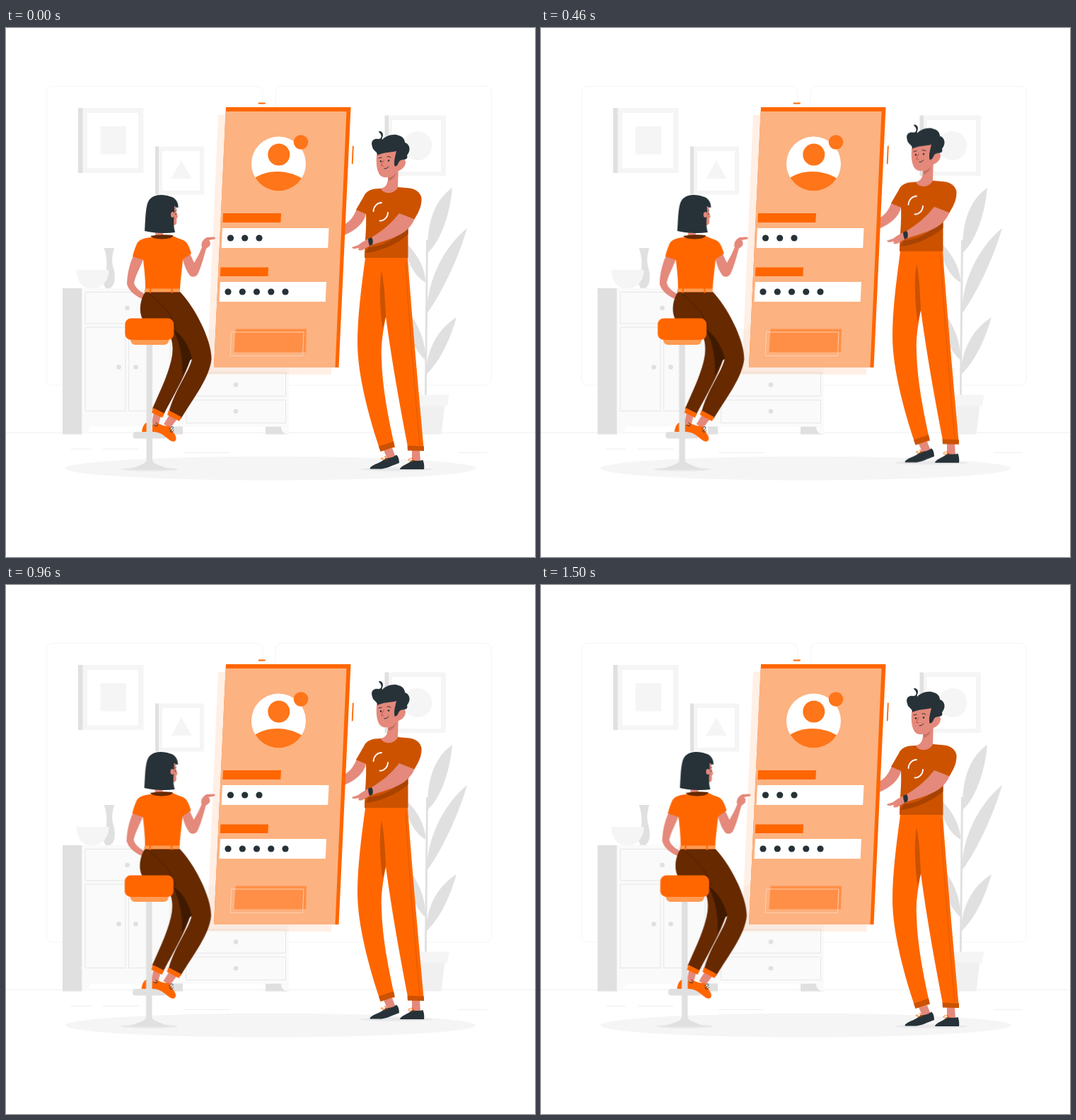
An HTML page without scripts for the animation above (1540 ms loop, 748 by 748 pixels).

```html
<!DOCTYPE html>
<html lang="en">
<head>
<meta charset="utf-8">
<title>Sign in illustration</title>
<style>
html, body { margin: 0; width: 100%; height: 100%; overflow: hidden; background: #fff; }
svg { display: block; width: 100vw; height: 100vh; }
.orange { fill: #f60; }
.rust { fill: #cc5200; }
.brown { fill: #662900; }
.peach { fill: #ff9a52; }
.skin { fill: #e4897b; }
.ink { fill: #263238; }
.white { fill: #fff; }
.g1 { fill: #fafafa; }
.g2 { fill: #f5f5f5; }
.g3 { fill: #f0f0f0; }
.g4 { fill: #e0e0e0; }
.line { fill: none; stroke-linecap: round; }
.man { animation: lift 1540ms linear infinite; }
.woman { animation: sway 1540ms linear infinite; }
@keyframes lift {
  0%, 97.4%, 100% { transform: translateY(0); }
  18.8% { transform: translateY(-5.4px); }
  29.9% { transform: translateY(-9.3px); }
  43.5% { transform: translateY(-14.1px); }
  46.8% { transform: translateY(-15px); }
  62.3% { transform: translateY(-10px); }
  76% { transform: translateY(-5.2px); }
}
@keyframes sway {
  0%, 100% { transform: translateX(0); }
  18.8% { transform: translateX(2px); }
  29.9% { transform: translateX(-3.3px); }
  43.5% { transform: translateX(-2px); }
  62.3% { transform: translateX(-.5px); }
  76% { transform: translateX(3px); }
  97.4% { transform: translateX(.4px); }
}
</style>
</head>
<body>
<svg viewBox="0 0 748 748">
  <defs>
    <clipPath id="avatar"><circle cx="385.5" cy="192" r="38.5"/></clipPath>
    <circle id="dot" r="4.6" class="ink"/>
    <circle id="knob" r="3.3" class="g4"/>
  </defs>

  <!-- Room -->
  <g fill="#fff" stroke="#f5f5f5">
    <rect x="57.4" y="82.4" width="305.4" height="422.8" rx="8.5"/>
    <rect x="381" y="82.4" width="305.4" height="422.8" rx="8.5"/>
  </g>
  <path class="line" stroke="#ebebeb" stroke-width=".8" d="M0 572.2H748M92 595.3H120M137 595.3H187M251 600.5H316M640 600.5H680"/>
  <g>
    <path class="g2" d="M108 113h86.5v92H108z"/><path class="g4" d="M102 113h6.5v92H102z"/>
    <path class="white" d="M115 120h72v78.5h-72z"/><path class="g2" d="M133.5 139h36.5v39.5h-36.5z"/>
    <path class="g2" d="M216 167.5h64v68h-64z"/><path class="g4" d="M211 167.5h5v68h-5z"/>
    <path class="white" d="M221 174h53v56h-53z"/><path class="g2" d="M248 187l14.5 26h-29z"/>
    <path class="g2" d="M541 123.5h81V209h-81z"/><path class="g4" d="M535.5 123.5h5.5V209h-5.5z"/>
    <path class="white" d="M546 130h69v73h-69z"/><circle class="g2" cx="582" cy="166.5" r="20.5"/>
  </g>

  <!-- Dresser -->
  <path class="g4" d="M80 368h27.5v206.5H80zM236 556h14v18.5h-14zM367 563.5h22l11 11h-33z"/>
  <path class="g1" d="M107.5 368H250V425H400V574.5Q389 574 389 563.5H119Q119 574 107.5 574.5z"/>
  <g class="line" stroke="#e6e6e6">
    <path d="M112.5 373.5H246V418H112.5zM112.5 423H169V541.5H112.5zM174 423H232V541.5H174z"/>
    <path d="M255 487H395.5V520.5H255zM255 526H395.5V558.5H255z"/>
  </g>
  <use href="#knob" x="171.5" y="396"/><use href="#knob" x="159.5" y="479.5"/>
  <use href="#knob" x="183.5" y="479.5"/><use href="#knob" x="325" y="504.5"/>
  <use href="#knob" x="325" y="542"/>
  <path class="g4" d="M138.500 311H153C150 322 149 330 152 340C155 350 155 364 147 368H141C135 360 140 350 142 340C143 330 142 320 138.500 311z"/>
  <path class="g2" d="M99.5 342H145.5C145 358 136 368 122 368.5S100 358 99.5 342z"/>

  <!-- Plant -->
  <g class="g4">
    <path d="M631 226C607 243 595 272 596 318C612 304 627 270 631 226z"/>
    <path d="M652 283C621 308 595 355 595 404C610 384 636 337 652 283z"/>
    <path d="M637 409C611 425 594 455 594 490C612 473 627 444 637 409z"/>
    <path d="M562 300C580 318 592 336 593.5 360C578 352 566 330 562 300z"/>
    <path d="M562 392C581 415 593 438 593.5 470C577 456 565 426 562 392z"/>
    <path d="M594 300h3L594.800 520H592z"/>
  </g>
  <path class="g3" d="M567 532h53.5l-5 42.5h-43.5z"/>
  <path class="g2" d="M563 518.5h63.5l-2.5 16h-58.5z"/>
  <ellipse class="g2" cx="374" cy="622.6" rx="290.2" ry="16.9"/>

  <!-- Man -->
  <g class="man">
    <ellipse cx="552" cy="624" rx="51" ry="2.6" fill="#e8e8ea"/>
    <path class="skin" d="M534 597l12-3 5 13-11 4zM574 597h11l1 16h-12z"/>
    <path class="ink" d="M514.5 622C520 616 531 615 537 608Q545 609 552 603.5Q556 607 556 615C547 618 541 622 531 623.5H515zM557 623C562 617 570 616 574 611Q582 613 589.5 611Q592 617 591 624H557.5z"/>
    <path class="line" stroke="#f60" d="M537 610C530 611 528 607 533 608M539 609C536 603 533 606 539 609M575 612C568 613 567 609 572 609M577 611C573 606 571 608 577 611"/>
    <path class="orange" d="M508 325H568C574 410 584 520 591 597H569C558 540 546 475 537 408C533 430 530 447 531 467C532 510 541 552 549 590L529 597C513 550 497 490 497 445C497 410 502 370 508 325z"/>
    <path class="rust" d="M531 343C527 368 529 400 532.5 425L537 408C536 385 535 362 531 343z"/>
    <path class="rust" d="M527 591.5l21-7 2 8-20.5 6.5zM567.5 590.5l23.5 1v6.5l-23-.5z"/>
    <path class="line" stroke="#d95700" stroke-width=".8" d="M565 330C570 420 578 510 585 590"/>
    <path class="skin" d="M496 256L509 263C506 276 495 286 478 293V278C488 273 492 265 496 256z"/>
    <path class="rust" d="M529 227C518 227 509 230 506 238C501 246 498 252 495 257L509 263C510 285 507 305 507 325H568.5V268L577 270C585 259 588 250 587.5 240C585 229 574 226 565 226L554 225z"/>
    <path fill="#a84200" d="M508 318L513 310C535 308 553 298 568.5 275V292C552 306 530 316 508 318z"/>
    <path class="line" stroke="#fff" stroke-width="1.8" d="M519.5 259C520 252 525 247 531 247M540 261C540 267 535 273 528.5 272.5"/>
    <path class="skin" d="M556 262C545 276 532 287 517 296C508 300 503 303 498 307L489 310C490 313 494 312 499 311C497 315 500 315 504 314L516 307C540 300 562 293 571 281Q576 275 577.5 270z"/>
    <path class="rust" d="M553 260L577.5 270.500L583 260L566 245z"/>
    <path class="ink" d="M512 298l5-2q3 5 1 10l-4 2q-2-5-2-10z"/>
    <path class="skin" d="M540 203L555 192L554 225C550 235 534 236 530 227Q540 225 540 212z"/>
    <path fill="#c96f63" d="M540.5 212Q549 210 552 204Q549 214 541 216z"/>
    <path class="skin" d="M525 173C523 185 523 199 528 207C534 215 545 211 552 203Q565 199 565 189Q563 182 555 184L552 168z"/>
    <path class="ink" d="M518 168C515 160 520 156 526 157C532 157 532 151 527 147C527 145 533 146 533 151C533 154 531 156 532 158C537 152 549 149 555 152C561 153 564 158 564 162C571 164 573 173 567 180C569 187 563 185 558 187C554 189 555 196 549.5 195.500C548 189 550 183 552 174C544 176 532 176 525 180C526 175 519 174 518 168z"/>
    <circle class="ink" cx="530" cy="188.5" r="1.3"/><circle class="ink" cx="541" cy="187.5" r="1.3"/>
    <path class="line" stroke="#263238" d="M527 184l4-1M539 182q3-1 5 1M535 199q4 0 6-3"/>
    <path class="line" stroke="#c0564b" d="M534 187L530.5 194.500L534 195"/>
  </g>

  <!-- Phone -->
  <path d="M300 123H476L460 490H284z" fill="#f60" opacity=".1"/>
  <path class="orange" d="M311 112H487.5L470.500 480H294z"/>
  <path fill="#fcb281" d="M310.5 118H481.5L465.500 480H294z"/>
  <path class="line" stroke="#f60" stroke-width="1.8" d="M357.5 106.500H366M490.8 167.500L489.700 191.500"/>
  <circle class="white" cx="385.5" cy="192" r="38.5"/>
  <g fill="#ff7519">
    <circle cx="385.8" cy="179" r="15.5"/>
    <path clip-path="url(#avatar)" d="M345 218C364 198 402 198 426 218V236H345z"/>
    <circle cx="417" cy="161.5" r="10.3"/>
  </g>
  <path class="orange" d="M307 262H389L388.300 275H306.400zM303.4 338.500H371L370.400 351H302.800z"/>
  <path class="white" d="M306 283H456.500L455.200 311H304.700zM303 359H453L451.700 387H301.500z"/>
  <use href="#dot" x="317.5" y="297"/><use href="#dot" x="337.7" y="297"/><use href="#dot" x="358" y="297"/>
  <use href="#dot" x="314" y="373"/><use href="#dot" x="334.3" y="373"/><use href="#dot" x="354.5" y="373"/>
  <use href="#dot" x="374.8" y="373"/><use href="#dot" x="395" y="373"/>
  <path fill="#ff8f47" d="M324.5 425.500H425L424 458.500H322.500z"/>
  <path class="line" stroke="#ffd3b3" stroke-width=".9" d="M319 430H421L419.500 463.500H317.500z"/>

  <!-- Woman -->
  <g class="woman">
    <ellipse cx="203" cy="624" rx="40" ry="2.6" fill="#e6e6e6"/>
    <path class="skin" d="M209 543l10 5-4 15-9-3z"/>
    <path class="orange" d="M192 571C193 562 197 557 202 557Q207 562 213 561Q220 567 217 573z"/>
    <path class="g4" d="M176 624C186 618 196 618 198.5 612V446H207V612C210 618 220 618 229 624z"/>
    <rect class="g4" x="179.5" y="571" width="47" height="9.5" rx="4"/>
    <path class="skin" d="M231 547l11 6-10 13-9-6z"/>
    <path class="orange" d="M214 558Q222 564 231 562.5C234 570 241 575 240.500 581C239 587 234 585 229 581C223 576 219 572 209 571z"/>
    <path class="line" stroke="#263238" d="M209 561c5 4 7 1 3-3M231 567c3-4 6-4 5-1s-4 2-4 4 4 2 5-1"/>
    <path class="brown" d="M222 415C234 435 237 447 235 462C232 484 219 511 207 538L223 546C240 514 254 490 261 468C260 445 250 425 240 415z"/>
    <path fill="#401a00" d="M234 422L256 430L266 466L260 470Q255 482 249 492C251 470 247 445 234 422z"/>
    <path class="skin" d="M180 322C174 335 171 350 171 362C174 374 188 382 196 384V376C188 372 182 366 181 360C183 350 190 338 194 327z"/>
    <path class="brown" d="M197 373H246C265 392 291 440 290.5 468C288 494 266 522 247 553L230 544C238 512 260 485 263 467C258 447 247 432 235 425L195 415C186 402 190 383 197 373z"/>
    <path class="line" stroke="#401a00" stroke-width=".7" d="M204 377C220 390 235 405 240 425"/>
    <path class="orange" d="M208 537l16 8-3 6-15-7zM230 540.5l18 9.5-3 6-17-9z"/>
    <path class="peach" d="M175 436H231Q231 448 224 448H182Q176 448 175 436z"/>
    <rect class="orange" x="168.3" y="410.5" width="69" height="30.5" rx="8.5"/>
    <path class="skin" d="M249 324C252 336 256 346 261 351C266 353 270 351 272 346C277 335 280 322 283 312L288 308Q290 303 287 300L295 298.500C297 297 296 295.500 293 295.500L284 296C278 299 275 305 277 310C274 318 269 327 266 332L260 319zM211 284h11v14h-11z"/>
    <path class="orange" d="M204 296C195 297 188 299 185 305C182 312 180 318 179 323L194 328C196 345 197 357 197 369H246C247 352 249 340 250 327L262 319C259 309 256 301 248 299Q242 297 236 294z"/>
    <path class="peach" d="M196.5 368.5H246V373.5H195.5z"/>
    <path class="line" stroke="#f60" stroke-width="2" d="M204 367v7M234.5 367v7"/>
    <path class="brown" d="M204 294Q220 291 236 293Q236 298 220 298.5Q207 298 204 294z"/>
    <path class="skin" d="M234 253H241L240.500 259L243 267L241 270C242 276 241 279 236 279z"/>
    <path class="ink" d="M199 252C201 241 208 236 219 236C225 236 229 237 231 238C239 239 244 246 243.500 254Q240 254 238 252C239 262 235 275 239 289C225 291 208 290 196 287C197 272 197 262 199 252z"/>
    <ellipse class="skin" cx="235.5" cy="264" rx="2.5" ry="4"/>
    <path class="line" stroke="#263238" stroke-width=".9" d="M239 259l2-1M240 262v2"/>
  </g>
</svg>
</body>
</html>
```
